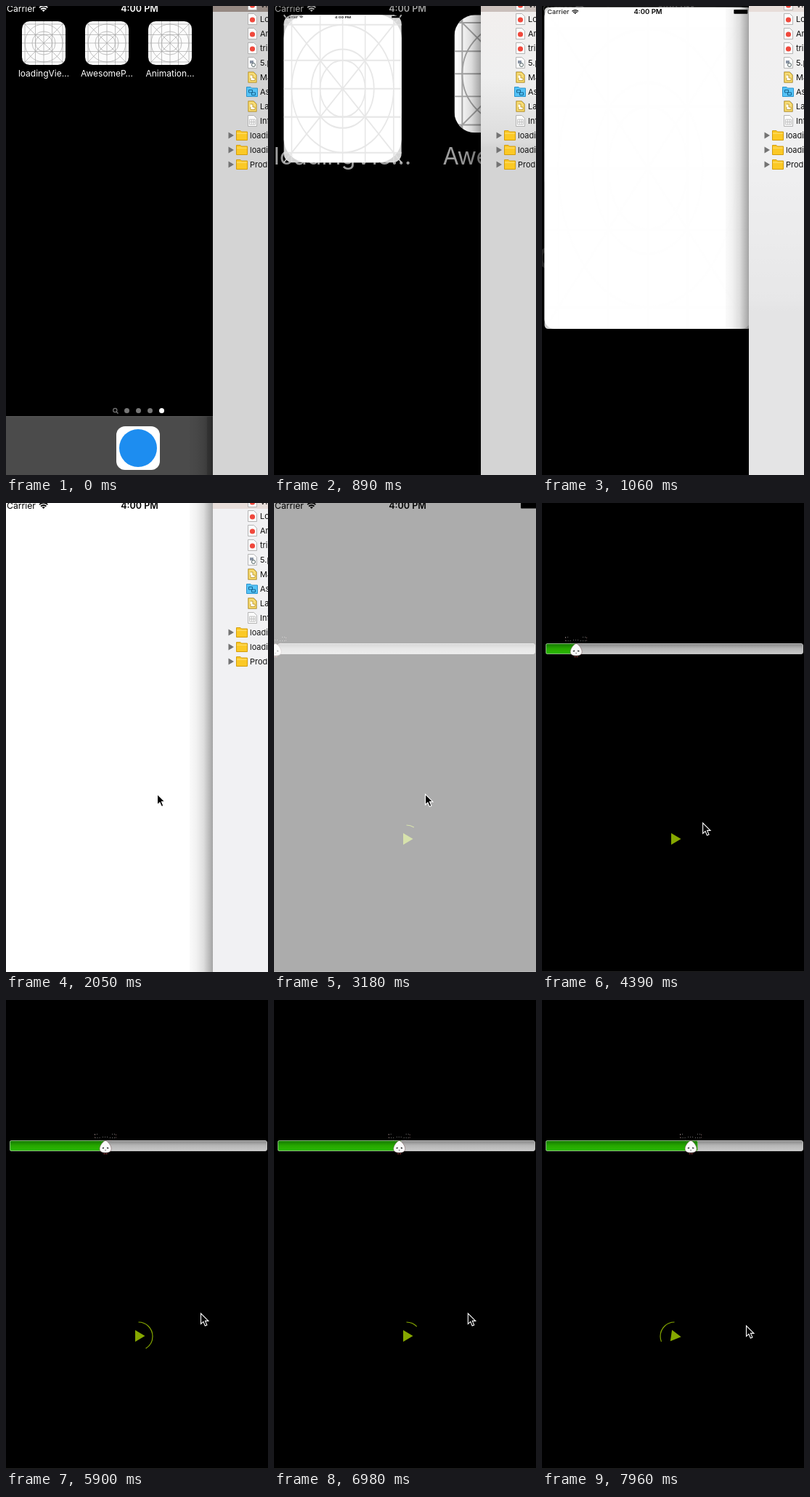
An HTML page for the animation above (8000 ms loop, 361 px wide and 645 px high).

```html
<!DOCTYPE html>
<html lang="en">
<head>
<meta charset="utf-8">
<style>
html, body { margin: 0; width: 100%; height: 100%; overflow: hidden; background: #000; }
svg { display: block; width: 361px; height: 645px; font-family: Inter, Roboto, sans-serif; }
</style>
</head>
<body>
<svg viewBox="0 0 361 645" width="361" height="645">
  <defs>
    <linearGradient id="track" x2="0" y2="1">
      <stop stop-color="#858585"/><stop offset=".45" stop-color="#b4b4b4"/><stop offset="1" stop-color="#cacaca"/>
    </linearGradient>
    <linearGradient id="fill" x2="0" y2="1">
      <stop stop-color="#167800"/><stop offset=".5" stop-color="#26a800"/><stop offset="1" stop-color="#2ab800"/>
    </linearGradient>
    <linearGradient id="shade">
      <stop stop-opacity=".02"/><stop offset=".27" stop-opacity=".05"/>
      <stop offset=".6" stop-opacity=".13"/><stop offset="1" stop-opacity=".36"/>
    </linearGradient>
    <linearGradient id="glow" x2="0" y2="1">
      <stop stop-color="#f3f0ef"/><stop offset=".5" stop-color="#f0f0f0"/>
      <stop offset=".95" stop-color="#dcdcdc"/><stop offset="1" stop-color="#dcdcdc" stop-opacity="0"/>
    </linearGradient>
    <g id="lines" fill="none">
      <path d="M4 0V60M18.5 0V60M30 0V60M41.5 0V60M56 0V60M0 4H60M0 18.5H60M0 30H60M0 41.5H60M0 56H60M0 0L60 60M60 0L0 60"/>
      <circle cx="30" cy="30" r="26"/><circle cx="30" cy="30" r="16"/><circle cx="30" cy="30" r="11.5"/>
    </g>
    <clipPath id="tile"><rect width="60" height="60" rx="10.5"/></clipPath>
    <g id="icon" clip-path="url(#tile)">
      <rect width="60" height="60" fill="#fcfcfc"/>
      <use href="#lines" stroke="#a6a6a6" stroke-width=".7"/>
    </g>
    <g id="status" font-size="12.2">
      <text x="1" y="8">Carrier</text>
      <text x="184" y="8" font-size="12.5" font-weight="600" text-anchor="middle">4:00 PM</text>
      <g fill="none" stroke="currentColor" stroke-width="1.7">
        <path d="M46 2.2Q51.7 -2.6 57.4 2.2M48 4.5Q51.7 1.5 55.4 4.5"/>
      </g>
      <path d="M49.6 5.8Q51.7 4.4 53.8 5.8L51.7 8Z"/>
      <rect x="340" y="-1" width="25" height="8.5" rx="1"/>
    </g>
  </defs>

  <rect width="361" height="645"/>

  <g id="player">
    <rect x="5.5" y="193.5" width="354" height="14" rx="2.5" fill="url(#track)" stroke="#bdbdbd"/>
    <rect id="done" x="5.5" y="193.5" height="14" rx="2" fill="url(#fill)" stroke="#86b87c"/>
    <g id="panda">
      <g fill="none" stroke-width="1">
        <path d="M-15 -17.5H-9M9 -17.5H15M-14.5 -12.5H-6M6 -12.5H14.5M-4 -13.5H4" stroke="#777" stroke-dasharray="1 2"/>
        <path d="M-14.5 -17V-11M14.5 -17V-11M-8 -9.5L-5 -7M8 -9.5L5 -7" stroke="#8a6a6a" stroke-dasharray="1 2.5"/>
        <path d="M-2.5 9.5H3" stroke="#a04040" stroke-dasharray="2 1"/>
      </g>
      <path d="M0 -8.5C3 -8 8 -2 8 2.5C8 6.5 5 8 0 8S-8 6.5 -8 2.5C-8 -2 -3 -8 0 -8.5Z" fill="#fafafa" stroke="#6e4a4a" stroke-width=".5"/>
      <path d="M-5 2L-2.2 .2V2.6ZM5 2L2.2 .2V2.6ZM-1 4H1L0 5Z" fill="#111"/>
    </g>
    <path id="arc" d="M182.5 443A19.5 19.5 0 0 1 182.5 482A19.5 19.5 0 0 1 182.5 443" pathLength="1" fill="none" stroke="#86a800" stroke-width="1.2"/>
    <path id="tri" d="M178 454L191.5 462L178 470Z" fill="#86a800"/>
    <rect y="644" width="361" height="1" fill="#222"/>
  </g>

  <g id="home">
    <rect id="homeBg" width="285" height="645"/>
    <g id="springboard">
      <g id="apps"></g>
      <g id="labels" fill="#fff" font-size="12" text-anchor="middle"></g>
      <g id="dots" fill="#777">
        <circle cx="150.3" cy="556" r="2.6" fill="none" stroke="#777" stroke-width="1.2"/>
        <path d="M152 558L154.5 560.5" stroke="#777" stroke-width="1.4"/>
        <circle cx="166.5" cy="556.5" r="3.5"/><circle cx="182.5" cy="556.5" r="3.5"/>
        <circle cx="198.5" cy="556.5" r="3.5"/><circle cx="214.5" cy="556.5" r="3.5" fill="#fff"/>
      </g>
      <g id="dock">
        <rect y="564" width="285" height="81" fill="#4b4b4b"/>
        <rect y="564" width="285" height="1" fill="#5a5a5a"/>
        <rect x="277" y="565" width="8" height="80" fill="#414141"/>
        <rect x="152" y="578" width="60" height="60" rx="12" fill="#fff"/>
        <circle cx="182" cy="608" r="26" fill="#1d8df0"/>
      </g>
    </g>
    <use id="bar" href="#status" fill="#fff" color="#fff"/>
  </g>

  <g id="launch">
    <rect id="back" fill="#d6d6d6"/>
    <rect id="sheet" fill="#fff"/>
    <use id="ghost" href="#lines" stroke="#e2e2e2" stroke-width=".6"/>
    <g id="mini"><use href="#status" x="4" y="6" fill="#000" color="#000"/></g>
  </g>

  <g id="editor">
    <rect id="edge" x="253" width="32" height="645" fill="url(#shade)"/>
    <rect x="285" width="76" height="645" fill="#d4d4d4"/>
    <rect id="glowBox" x="285" width="76" fill="url(#glow)"/>
    <rect id="light" x="285" width="76" height="645" fill="#f1f1f3"/>
    <rect id="picked" x="285" width="76" height="8"/>
    <g id="files" font-size="11" fill="#111"></g>
  </g>

  <path id="cursor" d="M0 0V14.5L3.4 11.4L5.8 17L8.4 16L6 10.4H10.4Z" fill="#000" stroke="#fff" stroke-width="1.1"/>
</svg>
<script>
const $ = id => document.getElementById(id);
const set = (id, attrs) => { for (const k in attrs) $(id).setAttribute(k, attrs[k]); };
const clamp = x => Math.max(0, Math.min(1, x));
const mix = (a, b, u) => a + (b - a) * u;
const LOOP = 8000;

// Linear track through [time, ...values]
function track(t, keys) {
  let i = 0;
  while (i < keys.length - 2 && t > keys[i + 1][0]) i++;
  const [a, b] = [keys[i], keys[i + 1]];
  const u = clamp((t - a[0]) / (b[0] - a[0]));
  return a.slice(1).map((v, j) => mix(v, b[j + 1], u));
}

const names = ['loadingVie…', 'AwesomeP…', 'Animation…'];
$('apps').innerHTML = names.map((n, i) => `<use href="#icon" x="${22 + 87 * i}" y="21"/>`).join('');
$('labels').innerHTML = names.map((n, i) => `<text x="${52 + 87 * i}" y="97">${n}</text>`).join('');

const page = 'M333.5 -7.5H341.5L345.5 -3.5V7.5H333.5Z';
const sheetIcon = inner => `<path d="${page}" fill="#fbfbfb" stroke="#a5a5a5" stroke-width=".8"/>${inner}`;
const icons = {
  code: sheetIcon('<circle cx="339.5" cy="1" r="3.6" fill="#f0483c"/>'),
  image: sheetIcon('<rect x="336" y="-3" width="5" height="4" fill="#8a94a4"/><circle cx="341" cy="3" r="2.5" fill="none" stroke="#566" />'),
  board: sheetIcon('<path d="M334 -7H341L345 -3V7H334Z" fill="#f6dc78" stroke="#d0a420"/><path d="M336.5 -3H340V1H343V4.5H337V1" fill="#fff" stroke="#b58d1c" stroke-width=".8"/>'),
  assets: '<path d="M331.5 -6.5H337L338.5 -5H346.5V6.5H331.5Z" fill="#55c3f7" stroke="#2a93cc"/><path d="M334.5 -2.5H339.5V1H334.5ZM338.5 1H343.5V4.5H338.5Z" fill="none" stroke="#14638f"/>',
  plist: sheetIcon('<path d="M335.5 -2H343.5V5H335.5ZM335.5 1.5H343.5M338.2 -2V5M341 -2V5" fill="none" stroke="#b5b5b5" stroke-width=".8"/>'),
  folder: '<path d="M306.5 -4.5L314 0L306.5 4.5Z" fill="#737373"/><path d="M317.5 -6.5H323L324.5 -5H332.5V6.5H317.5Z" fill="#fbc926" stroke="#d39c0c"/><path d="M318 -2.8H332" stroke="#ffe27a"/>'
};
const files = [
  ['code', 'ViewCont'], ['code', 'Loading'], ['code', 'Animat'], ['code', 'triangle'], ['image', '5.png'],
  ['board', 'Main.st'], ['assets', 'Assets'], ['board', 'Launch'], ['plist', 'Info.pl'],
  ['folder', 'loading'], ['folder', 'loading'], ['folder', 'Products']
];
$('files').innerHTML = files.map(([kind, name], i) =>
  `<g transform="translate(0 ${i * 20 - 2})">${icons[kind]}<text x="${kind === 'folder' ? 336 : 350}" y="4">${name}</text></g>`).join('');

const spring = s => 1 - (1 + 7.6 * s) * Math.exp(-7.6 * s);

function drawLaunch(t) {
  const p = t < 770 ? 0 : clamp(spring(Math.min(t - 740, 790) / 1000) / spring(.79));
  const x = mix(22, -4, p), y = mix(21, -6, p);
  const w = mix(60, 375, p), h = w * (1 + .779 * p), k = w / 60;

  // The icon grid zooms along with the opening window
  set('springboard', { transform: `translate(${x} ${y}) scale(${k}) translate(-22 -21)` });
  set('labels', { opacity: clamp(1 - 1.2 * p) });
  set('dock', { opacity: clamp(1 - 3 * p) });
  set('dots', { opacity: clamp(1 - 3 * p) });
  set('bar', { opacity: clamp(1 - 1.1 * p) });
  set('home', { display: t < 1530 ? 'inline' : 'none' });

  const box = { x, y, width: w, height: h };
  const r = 10.5 * (1 - p);
  set('back', { ...box, rx: r * 1.7, opacity: clamp(p * 6) });
  set('sheet', { ...box, rx: r * 4.5, opacity: clamp(p * 5) });
  set('ghost', { transform: `translate(${x} ${y}) scale(${k} ${h / 60})`, opacity: clamp(1.45 - 2 * p) });
  set('mini', { transform: `translate(${x} ${y}) scale(${w / 375} ${h / 667})` });
  const fade = t < 3180 ? 1 : clamp(1 - (t - 3130) / 413) ** 3;
  set('launch', { opacity: t < 770 ? 0 : fade });

  const lit = clamp((p - .35) / .65);
  set('glowBox', { height: Math.max(0, y + h - 20), opacity: clamp(p * 3) });
  set('light', { opacity: lit });
  const c = [[150, 231], [137, 221], [131, 217]].map(([a, b]) => Math.round(mix(a, b, clamp(p * 2))));
  set('picked', { fill: `rgb(${c})` });
  set('editor', { opacity: t < 2470 ? 1 : t < 2530 ? .4 : 0 });
}

function drawPlayer(t) {
  set('player', { display: t < 3125 ? 'none' : 'inline' });
  const [pos] = track(t, [[3290, 2], [3980, 23], [4390, 47], [5610, 113], [5900, 137], [7960, 205], [8000, 207]]);
  const lead = 10 * clamp((t - 6500) / 1400);
  set('panda', { transform: `translate(${pos} 202)` });
  set('done', { width: Math.max(0, pos + lead - 6), opacity: pos > 7 ? 1 : 0 });

  // Ring grows for half a turn of the cycle, then is wiped while the triangle spins
  const half = 629, ph = (Math.max(0, t - 3125) % (2 * half)) / half;
  const end = Math.min(1, ph), start = Math.max(0, ph - 1), len = end - start;
  set('arc', { 'stroke-dasharray': `${len} 2`, 'stroke-dashoffset': -start, opacity: len < .02 ? 0 : 1 });
  set('tri', { transform: `rotate(${360 * start} 182.5 462)` });
}

function drawCursor(t) {
  const [x, y] = track(t, [
    [1560, 366, 400], [1700, 290, 400], [1850, 235, 400], [2050, 208.5, 400.5], [3980, 208.5, 400.5],
    [4390, 221.5, 440], [4790, 262, 436], [5400, 270, 431.5], [5900, 268.5, 431],
    [7270, 267, 431], [7800, 281.5, 448], [8000, 281.5, 448]
  ]);
  set('cursor', { transform: `translate(${x} ${y})` });
}

function draw(t) {
  drawLaunch(t);
  drawPlayer(t);
  drawCursor(t);
}

const t0 = performance.now();
function tick(now) {
  draw(Math.max(0, now - t0) % LOOP);
  requestAnimationFrame(tick);
}
draw(0);
requestAnimationFrame(tick);
</script>
</body>
</html>
```
